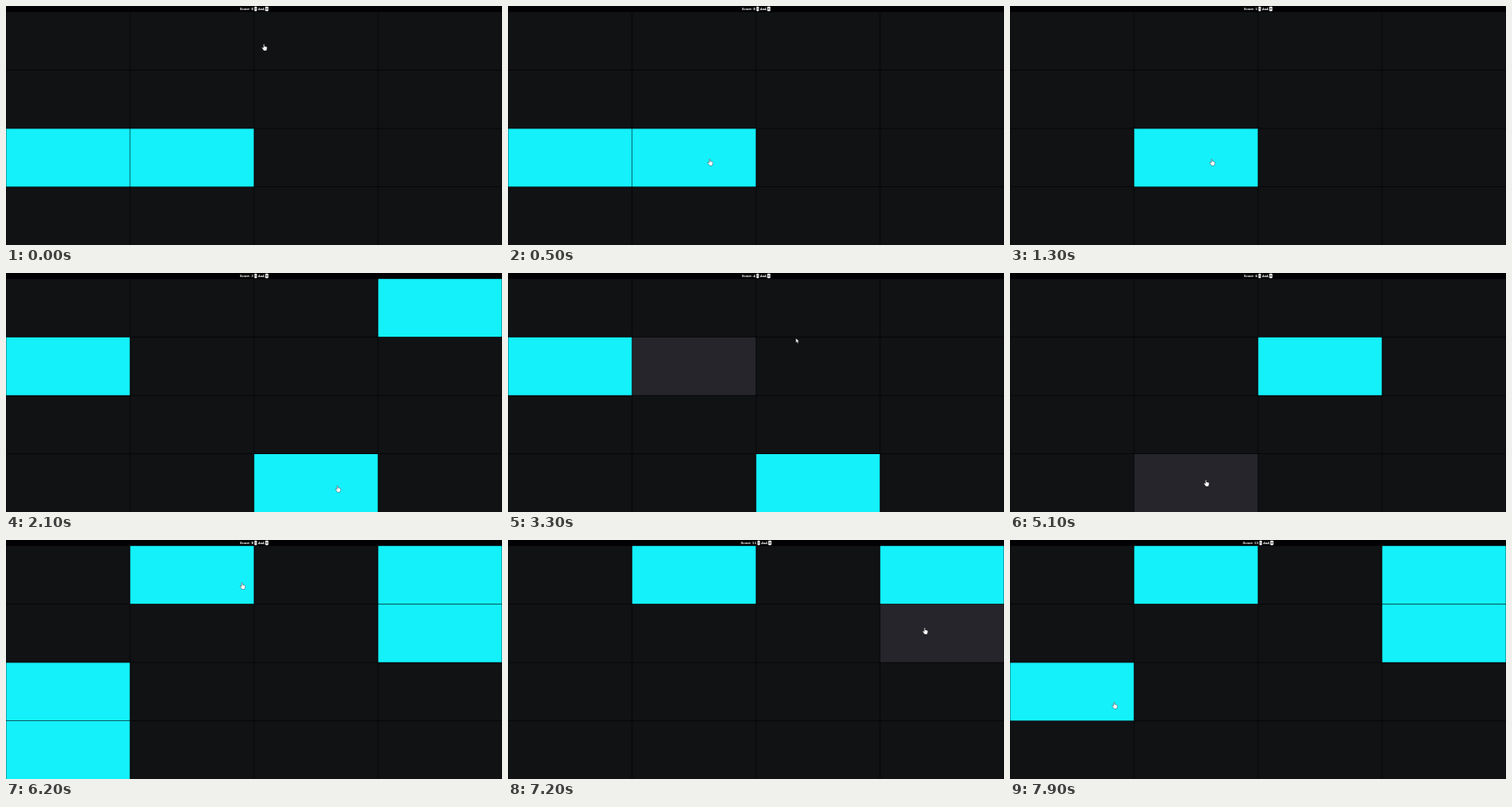
An HTML page that plays this animation: 600x289 px, repeating every 8 s.

```html
<!DOCTYPE html>
<html lang="en">
<head>
<meta charset="utf-8">
<title>Memory tiles</title>
<style>
  html, body { margin: 0; width: 100%; height: 100%; overflow: hidden; background: #020103; }
  svg { display: block; width: 600px; height: 289px; }
  text { font: 5px "Liberation Serif", "Times New Roman", serif; fill: #fff; stroke: #fff; stroke-width: .12; }
  .button { fill: #f0f0f0; }
  .sign { stroke: #222; stroke-width: .6; }
  .tile { fill: #101214; }
  .tile.hover { fill: #25252b; }
  .tile.lit { fill: #14f1fb; }
  .pointer { fill: #fff; stroke: #222; stroke-width: .4; stroke-linejoin: round; }
</style>
</head>
<body>
<svg viewBox="0 0 600 289">
  <rect width="600" height="289" fill="#020103"/>
  <g id="tiles"></g>
  <text id="score" y="5.1"></text>
  <g id="controls">
    <rect class="button" x="300.5" y=".8" width="3" height="5.4" rx=".7"/>
    <path class="sign" d="M301.3 3.5h1.4"/>
    <text x="304.9" y="5.1">4x4</text>
    <rect class="button" x="313.6" y=".8" width="3.8" height="5.4" rx=".7"/>
    <path class="sign" d="M314.5 3.5h2M315.5 2.5v2"/>
  </g>
  <g id="cursor" class="pointer">
    <path id="hand" d="M-1.6-3.6q.7-.7 1.2 0v2.4l2.4.5q1 .3.9 1.2l-.4 2.3-.6 1.3h-3l-1.8-2.6-.6-1.3q.6-.8 1.9.6z"/>
    <path id="arrow" d="M-1.8-3v5.2l1.3-1 .9 1.9 1-.5-.9-1.8 1.7-.2z"/>
  </g>
</svg>
<script>
const LOOP = 8000, STEP = 100, FLASH = 1000, TRAVEL = 500;
const COLS = 4, ROWS = 4, TOP = 6.9, TILE_W = 150, TILE_H = 70.6, INSET = .3;
const $ = id => document.getElementById(id);

// Clicks of each round: [x, y, time]. They give the pattern, the score and the pointer path.
const rounds = [
  [[245, 189, 1300], [120, 186, 1600]],
  [[402, 261, 2900], [20, 130, 3100], [460, 66, 3600]],
  [[385, 115, 4900], [238, 254, 5200], [120, 190, 5400], [110, 120, 5600]],
  [[286.5, 55.5, 6700], [500, 45, 7000], [505, 110, 7300], [127, 200, 7900], [120, 250, 8200]]
];
const stops = [[313, 50, 0], ...rounds.flat()];

const tiles = Array.from({ length: COLS * ROWS }, (_, i) => {
  const rect = document.createElementNS("http://www.w3.org/2000/svg", "rect");
  const box = {
    x: i % COLS * TILE_W + INSET,
    y: TOP + Math.floor(i / COLS) * TILE_H + INSET,
    width: TILE_W - 2 * INSET,
    height: TILE_H - 2 * INSET
  };
  for (const key in box) rect.setAttribute(key, box[key]);
  return $("tiles").appendChild(rect);
});

const tileAt = ([x, y]) =>
  Math.floor((y - TOP) / TILE_H) * COLS + Math.floor(x / TILE_W);

// Leaves right after a click, slows down, and settles one step before the next.
function pointerAt(t) {
  const next = stops.findIndex(s => s[2] > t);
  const [x0, y0, t0] = stops[next - 1], [x1, y1, t1] = stops[next];
  const p = Math.min(1, (t - t0) / Math.min(TRAVEL, t1 - t0 - STEP));
  const k = 1 - (1 - p) ** 2;
  return [x0 + (x1 - x0) * k, y0 + (y1 - y0) * k];
}

function draw(t) {
  const clicked = click => click[2] <= t;
  const current = rounds.findIndex(r => !r.every(clicked));
  const shown = current ? rounds[current - 1].at(-1)[2] : 0;
  const flashing = t < shown + FLASH;
  const lit = rounds[current].filter(c => flashing || clicked(c)).map(tileAt);
  const score = rounds.flat().filter(clicked).length;

  // The highlight trails the pointer by one step.
  const pos = pointerAt(t);
  const hover = t < STEP ? -1 : tileAt(pointerAt(t - STEP));
  const lagging = hover >= 0 && hover !== tileAt(pos);

  tiles.forEach((tile, i) => {
    const state = lit.includes(i) ? " lit" : i === hover ? " hover" : "";
    tile.setAttribute("class", "tile" + state);
  });

  const shift = score > 9 ? 1.25 : 0;
  $("score").textContent = "Score: " + score;
  $("score").setAttribute("x", 282.8 - shift);
  $("controls").setAttribute("transform", `translate(${shift})`);
  $("cursor").setAttribute("transform", `translate(${pos})`);
  $("hand").style.display = lagging ? "none" : "";
  $("arrow").style.display = lagging ? "" : "none";
}

const start = performance.now();
function tick() {
  const t = (performance.now() - start) % LOOP;
  draw(Math.floor(t / STEP) * STEP);
  requestAnimationFrame(tick);
}
tick();
</script>
</body>
</html>
```
